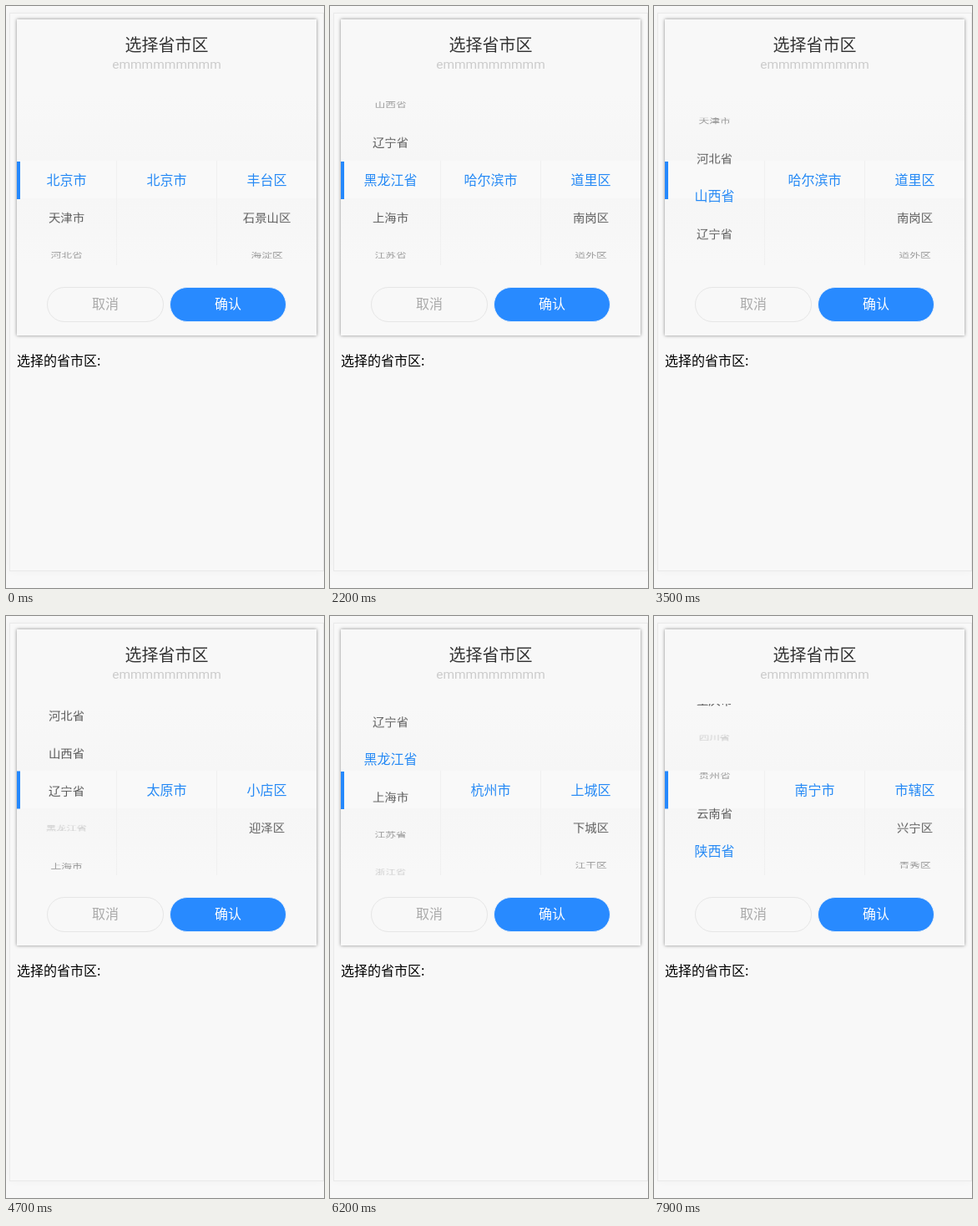
These frames come from a looping animation (381 px wide and 696 px high, 8 s). An HTML page:

```html
<!DOCTYPE html>
<html lang="zh-CN">
<head>
<meta charset="utf-8">
<title>选择省市区</title>
<style>
  html, body { margin: 0; width: 100%; height: 100%; overflow: hidden; }
  body {
    position: relative;
    background: #f8f8f8;
    font: 350 16px/24px "Noto Sans CJK SC", "Noto Sans CJK", "Noto Sans", sans-serif;
  }
  body * { box-sizing: border-box; }
  div, span { position: absolute; white-space: nowrap; }
  .phone {
    left: 4px; top: 8px; width: 377px; height: 668px;
    border: 1px solid #e9e9e9;
    box-shadow: 0 0 10px rgba(0, 0, 0, .03);
  }
  .card {
    left: 13px; top: 16px; width: 359px; height: 378px;
    background: #f8f8f8;
    box-shadow: 0 0 4px rgba(0, 0, 0, .45);
  }
  .title, .sub { left: 0; width: 100%; text-align: center; }
  .title { top: 18px; font-size: 20px; color: #333; }
  .sub { top: 42px; font: 15.5px/24px Roboto, sans-serif; color: #ccc; }
  .wheel {
    left: 0; top: 89px; width: 359px; height: 205px;
    overflow: hidden;
    background: linear-gradient(#f8f8f8, #f6f6f6 80px, #f9f9f9 80px, #f9f9f9 125px, #f6f6f6 125px, #f8f8f8);
  }
  .col { top: 0; width: 120px; height: 205px; }
  .col + .col::before {
    content: ""; position: absolute;
    left: -1px; top: 80px; width: 1px; height: 125px;
    background: #f0f0f0;
  }
  .col span {
    left: 0; top: 80px; width: 119px; height: 45px;
    line-height: 45px; text-align: center;
  }
  .bar {
    left: 0; top: 169px; width: 4px; height: 45px;
    background: #2589fd; transform: translateY(.5px);
  }
  .btn {
    top: 320px; width: 140px; height: 42px;
    border: 1px solid #e6e6e6; border-radius: 21px;
    line-height: 37px; text-align: center; color: #aaa;
  }
  .cancel { left: 36px; }
  .ok { left: 183px; background: #288aff; border-color: #e3eefb; color: #fff; }
  .result { left: 13px; top: 411px; color: #000; }
</style>
</head>
<body>
<div class="phone"></div>
<div class="card">
  <div class="title">选择省市区</div>
  <div class="sub">emmmmmmmmm</div>
  <div class="wheel">
    <div class="col" style="left:0"></div>
    <div class="col" style="left:120px"></div>
    <div class="col" style="left:240px"></div>
  </div>
  <div class="bar"></div>
  <div class="btn cancel">取消</div>
  <div class="btn ok">确认</div>
</div>
<div class="result">选择的省市区:</div>
<script>
const LOOP = 8000, TICK = 100, ROW = 45;

const provinces = ('北京市 天津市 河北省 山西省 辽宁省 黑龙江省 上海市 江苏省 浙江省 安徽省 福建省 ' +
  '山东省 河南省 湖北省 湖南省 广东省 广西省 海南省 重庆市 四川省 贵州省 云南省 陕西省 甘肃省 青海省').split(' ');

// province index -> city followed by its districts
const areas = {
  0: '北京市 丰台区 石景山区 海淀区',
  1: '天津市 和平区 河东区 河西区',
  3: '太原市 小店区 迎泽区',
  5: '哈尔滨市 道里区 南岗区 道外区',
  8: '杭州市 上城区 下城区 江干区',
  11: '济南市 历下区 市中区 槐荫区',
  16: '南宁市 市辖区 兴宁区 青秀区'
};

// [start, ticks, target row]; a fractional target is a held drag
const moves = [
  [700, 3, 1], [1100, 4, 3], [2000, 3, 5], [2800, 8, 2.57], [3900, 2, 3],
  [4700, 6, 8], [6100, 3, 5], [6600, 3, 11], [7200, 3, 16], [7800, 3, 22]
];

// look by distance from the chosen row: colour, scale, tilt
const looks = [
  ['#2589f5', 1, 0], ['#5c5c5c', .9, 25], ['#999', .8, 50], ['#ccc', .77, 50], ['#555', .9, 25]
];

const cols = [...document.querySelectorAll('.col')];

function fill(col, names) {
  col.replaceChildren(...names.map(name => {
    const item = document.createElement('span');
    item.textContent = name;
    return item;
  }));
}

function place(col, pos, chosen) {
  [...col.children].forEach((item, i) => {
    const d = i - chosen;
    const [color, scale, tilt] = looks[Math.min(Math.abs(d), 4)];
    const y = (i - pos) * ROW;
    item.style.color = color;
    item.style.transform = `translateY(${y}px) scale(${scale}) rotateX(${-Math.sign(d) * tilt}deg)`;
  });
}

function stateAt(time) {
  let pos = 0, chosen = 0, area = 0;
  for (const [start, ticks, to] of moves) {
    if (time < start) break;
    const p = Math.min(1, ((time - start) / TICK + 1) / ticks);
    const drag = !Number.isInteger(to);
    pos += (to - pos) * (drag ? p : 1 - (1 - p) ** 1.19);
    chosen = drag ? Math.round(pos) : to;
    if (p === 1 && !drag) area = to;
  }
  return { pos, chosen, area };
}

let shownArea = -1;

function draw(now) {
  const time = Math.floor(now % LOOP / TICK) * TICK;
  const { pos, chosen, area } = stateAt(time);
  place(cols[0], pos, chosen);
  if (area !== shownArea) {
    const [city, ...districts] = areas[area].split(' ');
    fill(cols[1], [city]);
    fill(cols[2], districts);
    place(cols[1], 0, 0);
    place(cols[2], 0, 0);
    shownArea = area;
  }
}

fill(cols[0], provinces);
const begin = performance.now();
function frame() {
  draw(performance.now() - begin);
  requestAnimationFrame(frame);
}
frame();
</script>
</body>
</html>
```
